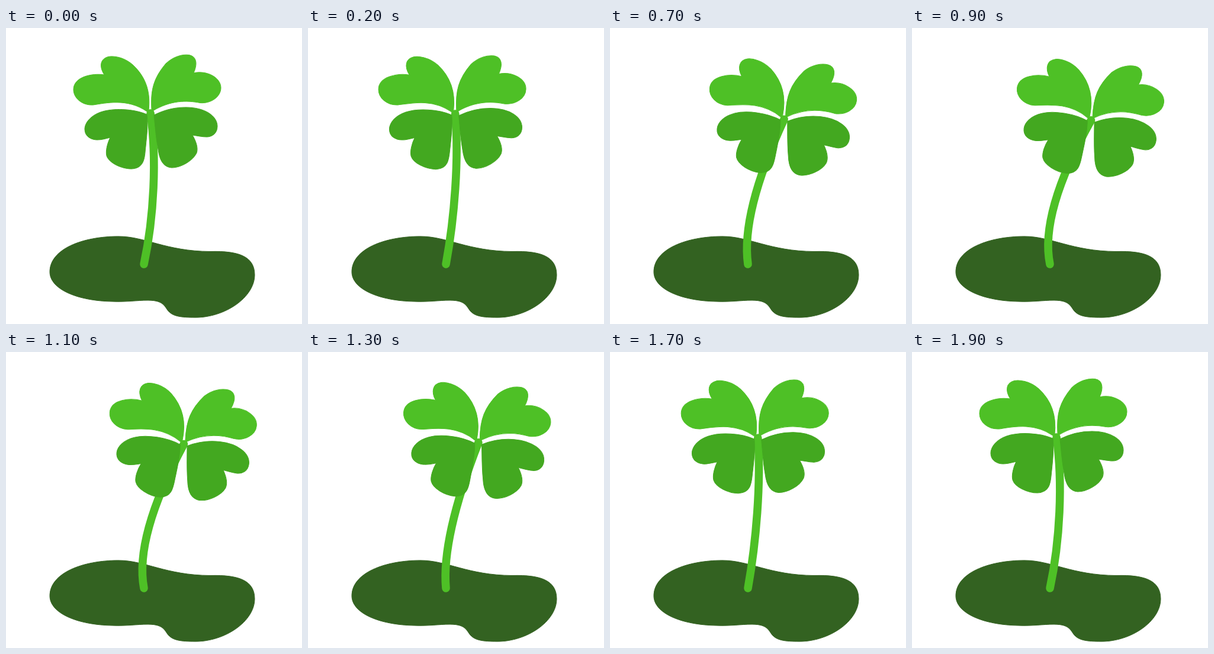
An HTML page for the animation above (2 s loop, 500 by 500 pixels).

```html
<!DOCTYPE html>
<html>
<head>
<meta charset="utf-8">
<style>
html, body { margin: 0; width: 100%; height: 100%; overflow: hidden; background: #fff; }
svg { display: block; width: 100%; height: 100%; }
.light { fill: #4ec026; stroke: #4ec026; }
.mid { fill: #43a820; stroke: #43a820; }
.ground { fill: #336221; stroke: #336221; }
#stem { fill: none; stroke: #4ec026; stroke-width: 13.6; stroke-linecap: round; }
</style>
</head>
<body>
<svg viewBox="0 0 500 500">
  <path class="ground" d="M74 412C74 373 130 352 190 352C235 352 270 377 345 377.5C395 376 420 387 420 417C420 455 370 489 320 489C295 489 283 487 275 479C268 472 268 460 240 460C220 460 205 463 180 462C120 461 74 441 74 412Z"/>
  <g class="light head">
    <path d="M241 139C244 112 239 85 214 62C198 48 180 47 173 48.5C159 52 157 65 166 79C146 76 114 82 114 104C114 118 128 131 147 130C168 127 205 118 238 141Z"/>
    <path d="M246 138C244 105 249 85 270 60C283 48 298 44 309 45.5C322 48 324 60 317 76C338 71 363 83 363 101C363 117 345 128 328 126.5C305 122 278 122 248 140Z"/>
  </g>
  <path id="stem"/>
  <g class="mid head">
    <path d="M238 146C215 136 180 135 160 142C143 148 133 160 133 171C133 184 145 189 154 189C162 189 168 187 176 185C171 195 168 208 170 216C174 228 195 238 212 238C236 237 234 215 236 200C238 180 240 165 238 146Z"/>
    <path d="M250 147C270 137 287 134 304 134C335 134 357 148 357 166C357 179 347 184 339 184C331 184 323 182 315 181C321 191 325 203 322 211C316 224 296 236 280 236C264 235 259 220 257 205C253 183 252 165 250 147Z"/>
  </g>
</svg>
<script>
const stem = document.getElementById('stem');
const heads = document.querySelectorAll('.head');
const LOOP = 2000, STEP = 50, SWING = 950, LAG = 10;

const easeInOut = x => x < .5 ? 2 * x * x : 1 - 2 * (1 - x) ** 2;

// Lean of the plant: 0 upright, 1 fully bent
function leanAt(ms) {
  const t = Math.floor(ms % LOOP / STEP) * STEP - LAG;
  const x = Math.min(t, 2 * SWING - t) / SWING;
  return easeInOut(Math.max(0, x));
}

function draw(p) {
  const mix = (a, b) => a + (b - a) * p;
  stem.setAttribute('d', `M233 399C${mix(250, 218.5)} ${mix(320, 330.5)} ` +
    `${mix(255, 258)} ${mix(220, 236)} ${mix(244, 303)} ${mix(144, 156)}`);
  for (const head of heads) {
    head.setAttribute('transform',
      `translate(${59.3 * p} ${11.6 * p}) rotate(${6.4 * p} 244 140)`);
  }
}

const start = performance.now();
function tick() {
  draw(leanAt(performance.now() - start));
  requestAnimationFrame(tick);
}
tick();
</script>
</body>
</html>
```
